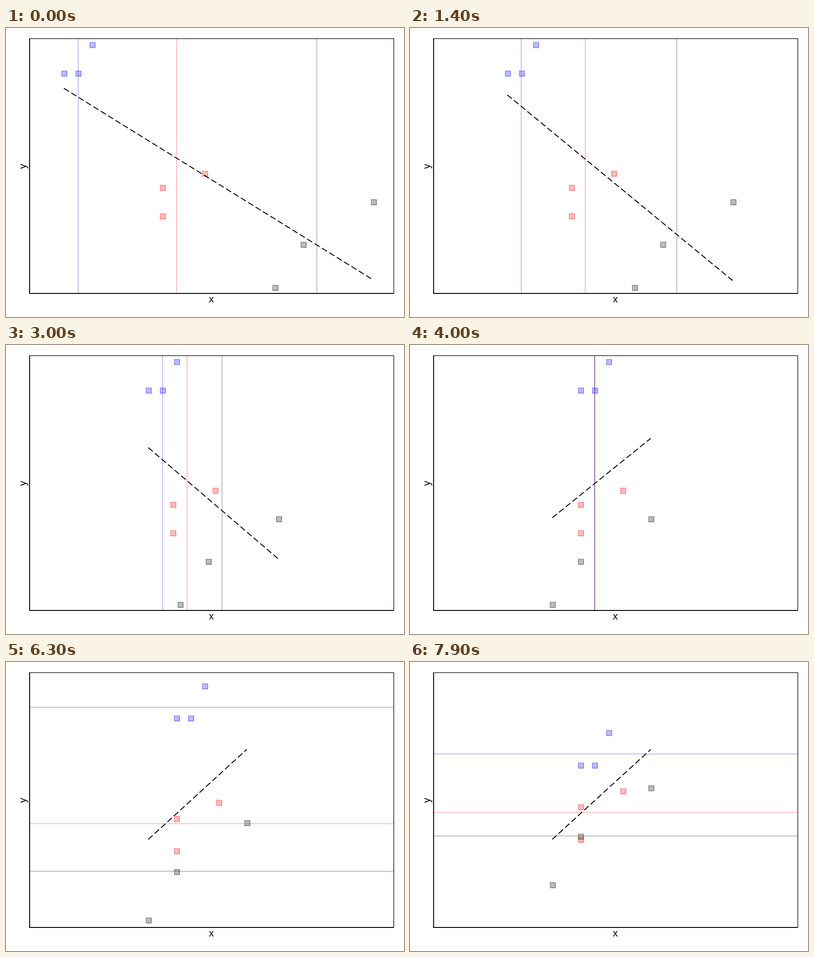
Recreate the animation shown at these times as a matplotlib script. Size 877 px wide and 638 px high, loop 8 s.

```python
import numpy as np
import matplotlib.pyplot as plt
from matplotlib.animation import FuncAnimation

W, H, DPI = 877, 638, 100
LEFT, RIGHT, TOP, BOTTOM = 52, 854, 23, 586
PAD = 13.6
STEP_MS, TICK_MS, LOOP_MS = 200, 100, 8000
X_STEPS, Y_START = 20, 5500
X_RANGE, Y_RANGE = (0, 25), (1, 16)

# One row per group, drawn in this order.
COLORS = ["black", "red", "blue"]
XS = np.array([[17, 19, 24], [9, 9, 12], [2, 3, 4]], float)
YS = np.array([[0, 3, 6], [7, 5, 8], [15, 15, 17]], float)


def px(points):
    return points * 72 / DPI


def pull_to_mean(values, amount):
    """Shift every group towards the grand mean, keeping its inner spread."""
    shift = values.mean() - values.mean(axis=1, keepdims=True)
    return values + amount * shift


def to_px_x(x):
    lo, hi = X_RANGE
    return LEFT + PAD + (x - lo) / (hi - lo) * (RIGHT - LEFT - 2 * PAD)


def to_px_y(y, lo, hi):
    return BOTTOM - PAD - (y - lo) / (hi - lo) * (BOTTOM - TOP - 2 * PAD)


def crisp(v):
    return np.floor(v) + 0.5


fig = plt.figure(figsize=(W / DPI, H / DPI), dpi=DPI, facecolor="white")
ax = fig.add_axes([0, 0, 1, 1])
ax.set_xlim(0, W)
ax.set_ylim(H, 0)
ax.axis("off")


def stroke(xs, ys, width, color="black", **kw):
    return ax.plot(xs, ys, color=color, lw=px(width),
                   solid_capstyle="butt", dash_capstyle="butt", **kw)[0]


def squares(color, size, **kw):
    line = ax.plot([], [], "s", ms=px(size), alpha=0.26, zorder=2, **kw)[0]
    line.set_snap(False)
    return line


fills = [squares(c, 13, mfc=c, mec="none") for c in COLORS]
outlines = [squares(c, 11, mfc="none", mec=c, mew=px(2)) for c in COLORS]
means = [stroke([], [], 2, c, alpha=0.26, zorder=3) for c in COLORS]
fit = stroke([], [], 2, zorder=4)
fit.set_linestyle((0, (13 / 2, 6.12 / 2)))

stroke([LEFT, RIGHT, RIGHT], [TOP, TOP, BOTTOM], 1.3, zorder=5)
stroke([LEFT, LEFT, RIGHT], [TOP, BOTTOM, BOTTOM], 2, zorder=5)

label = dict(family="Liberation Sans", fontsize=px(22), ha="center",
             va="baseline", rotation_mode="anchor")
ax.text(452.7, 606, "x", **label)
ax.text(44.5, 304.5, "y", rotation=90, **label)


def draw(frame):
    t = frame * TICK_MS
    moving_y = t >= Y_START
    x = pull_to_mean(XS, min(t // STEP_MS, X_STEPS) / X_STEPS)
    y = YS
    if moving_y:
        y = pull_to_mean(YS, (t - Y_START) // STEP_MS / X_STEPS)

    # The vertical scale widens only when the data needs it.
    lo, hi = min(Y_RANGE[0], y.min()), max(Y_RANGE[1], y.max())
    gx, gy = to_px_x(x), to_px_y(y, lo, hi)

    for i in range(len(COLORS)):
        for marks in (fills[i], outlines[i]):
            marks.set_data(crisp(gx[i]), crisp(gy[i]))
        if moving_y:
            means[i].set_data([LEFT, RIGHT], [gy[i].mean()] * 2)
        else:
            means[i].set_data([gx[i].mean()] * 2, [TOP, BOTTOM])

    slope, offset = np.polyfit(gx.ravel(), gy.ravel(), 1)
    ends = np.array([gx.min(), gx.max()])
    fit.set_data(ends, slope * ends + offset)
    return [*fills, *outlines, *means, fit]


anim = FuncAnimation(fig, draw, frames=LOOP_MS // TICK_MS, interval=TICK_MS,
                     repeat=True, repeat_delay=0, blit=False)
plt.show()
```
